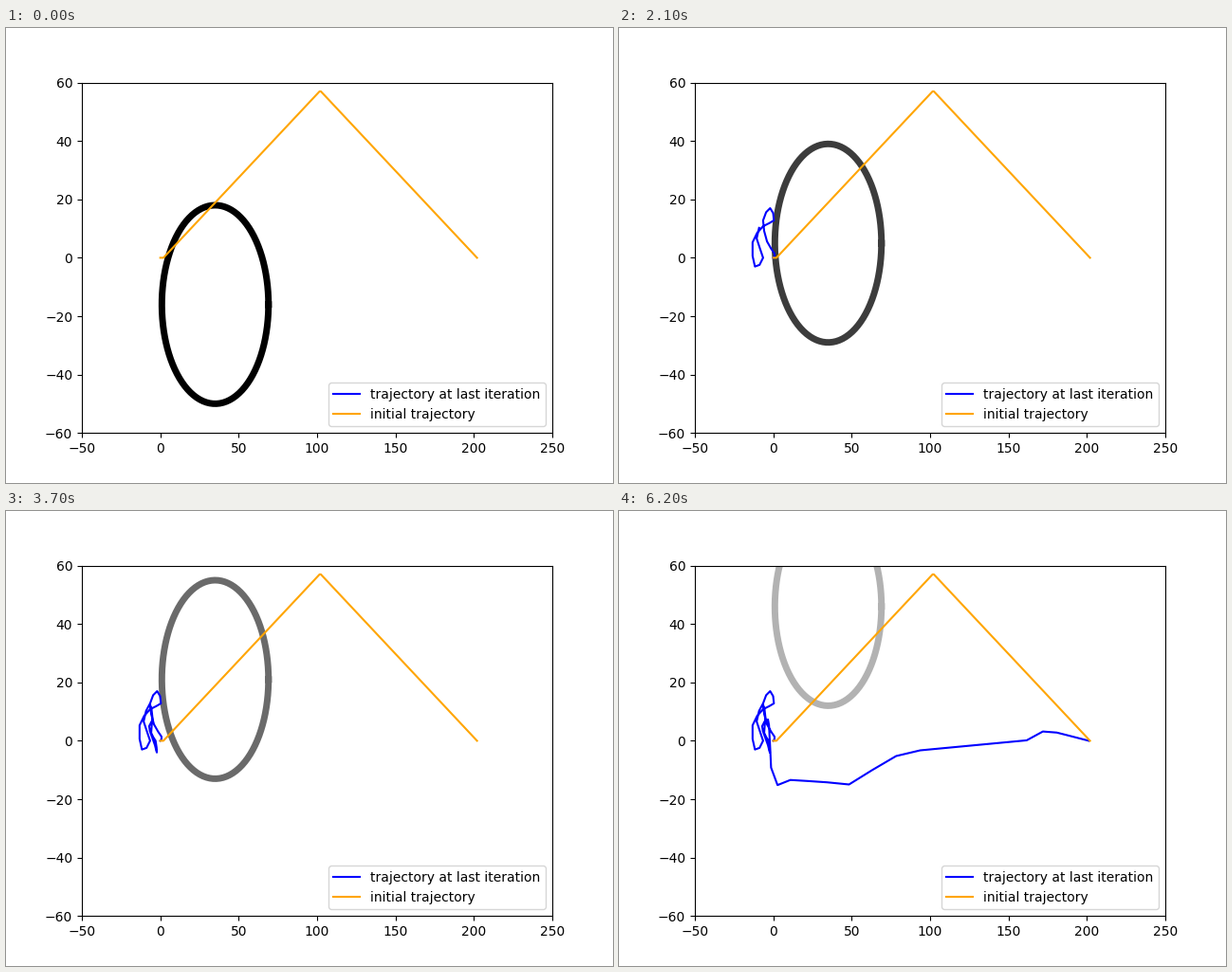
A matplotlib script that plays this animation: 640x480 px, repeating every 6300 ms.

```python
import numpy as np
import matplotlib.pyplot as plt
from matplotlib.animation import FuncAnimation

FRAMES = 63
INTERVAL = 100
RADIUS = 34
CENTER_X, START_Y = 35, -16
LAST_X = 201.2

# Wandering near the start: one key point for every second step.
WANDER = np.array([
    (0, 0), (.8, 1.4), (-4, 5.6), (-6.5, 12.8), (-2, 17), (.4, 12.8),
    (-6.5, 10.8), (-13.2, 5.3), (-11.7, -3), (-6.5, 0), (-10.6, 6.6),
    (-6.8, 12.5), (-5, 8), (-5.8, 2.7), (-3, 0), (-2.2, -4),
    (-3.4, -1.5), (-5.4, 1.5), (-7.1, 5), (-3.4, 7.3), (-2.4, 1.8),
    (-1.4, -9.2),
])

# Bends of the way to the goal.
BENDS = np.array([
    (-1.4, -9.2), (2.6, -15.2), (11, -13.4), (34, -14.2), (47.3, -15.3),
    (77, -5.4), (93.3, -3.3), (162.5, .2), (172, 3.2), (181, 2.8),
    (LAST_X, 0),
])


def add_midpoints(keys):
    """Insert the Catmull-Rom midpoint between neighbouring keys."""
    first, last = 2 * keys[0] - keys[1], 2 * keys[-1] - keys[-2]
    p = np.vstack([first, keys, last])
    smooth = np.empty((2 * len(keys) - 1, 2))
    smooth[::2] = keys
    smooth[1::2] = (9 * (p[1:-2] + p[2:-1]) - p[:-3] - p[3:]) / 16
    return smooth


def run_to_goal(steps):
    """Speed up and slow down along the bends, fastest before halfway."""
    t = np.arange(1, steps + 1) / steps
    ease = np.sin(np.pi / 2 * t ** 0.8) ** 2
    x = BENDS[0, 0] + (LAST_X - BENDS[0, 0]) * ease
    return np.column_stack([x, np.interp(x, *BENDS.T)])


wander = add_midpoints(WANDER)
points = np.vstack([wander, run_to_goal(FRAMES - len(wander))])

fig, ax = plt.subplots(figsize=(6.4, 4.8), dpi=100)
ax.set_xlim(-50, 250)
ax.set_ylim(-60, 60)

angle = np.linspace(0, 2 * np.pi, 200)
ring, = ax.plot([], [], lw=5)
path, = ax.plot([], [], color="blue", label="trajectory at last iteration")
ax.plot([0, 2, 101.6, 102.4, 202], [0, 0, 57, 57, 0], color="orange",
        label="initial trajectory")
ax.legend(loc="lower right")


def update(n):
    ring.set_data(CENTER_X + RADIUS * np.cos(angle),
                  START_Y + n + RADIUS * np.sin(angle))
    ring.set_color(str(n / 89))
    path.set_data(*points[:n + 1].T)
    return ring, path


anim = FuncAnimation(fig, update, frames=FRAMES, interval=INTERVAL,
                     repeat=True, repeat_delay=0)
plt.show()
```
